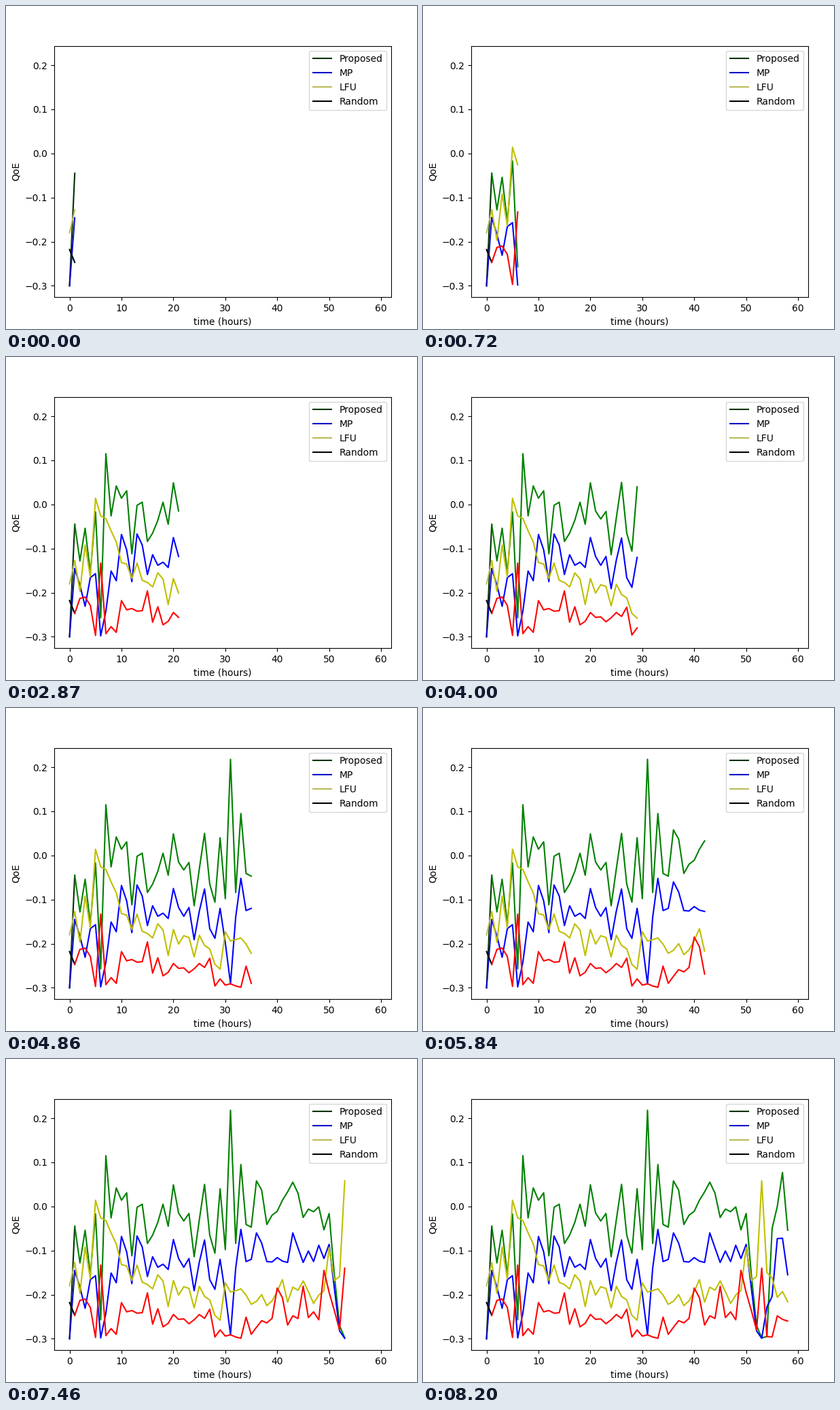
These frames come from a looping animation (605x475 px, 8220 ms). A matplotlib script:

```python
import numpy as np
import matplotlib.pyplot as plt
from matplotlib.animation import FuncAnimation

WIDTH, HEIGHT, DPI = 605, 475, 100
LOOP_MS, TICK_MS = 8220, 30

# Hourly QoE, in thousandths
PROPOSED = [
    -300, -45, -128, -54, -155, -17, -257, 115, -26, 42,
    14, 31, -112, -2, 5, -84, -65, -36, 5, -45,
    49, -15, -33, -16, -114, -30, 50, -65, -106, 40,
    -98, 218, -84, 95, -41, -47, 58, 37, -41, -20,
    -11, 14, 33, 55, 30, -25, -6, -12, -1, -53,
    -16, -155, -270, -298, -295, -50, 0, 77, -54]
MOST_POPULAR = [
    -300, -146, -183, -231, -166, -157, -298, -242, -151, -173,
    -68, -103, -175, -67, -92, -159, -114, -138, -131, -143,
    -75, -118, -138, -118, -191, -126, -76, -166, -188, -120,
    -198, -291, -140, -52, -125, -120, -60, -83, -125, -126,
    -116, -124, -127, -60, -94, -127, -101, -125, -88, -118,
    -86, -185, -282, -299, -228, -204, -73, -72, -155]
LEAST_USED = [
    -180, -128, -197, -92, -164, 14, -26, -32, -60, -85,
    -132, -135, -168, -133, -172, -177, -187, -155, -169, -227,
    -168, -201, -182, -186, -230, -181, -204, -212, -247, -258,
    -173, -194, -191, -187, -201, -222, -215, -200, -225, -214,
    -193, -166, -217, -183, -190, -169, -193, -220, -201, -191,
    -93, -168, -159, 58, -150, -162, -206, -193, -216]
RANDOM = [
    -218, -247, -213, -210, -229, -297, -133, -293, -277, -290,
    -218, -239, -236, -242, -241, -196, -267, -232, -273, -265,
    -245, -256, -255, -266, -257, -245, -254, -233, -296, -280,
    -294, -291, -296, -299, -251, -290, -274, -259, -264, -254,
    -185, -207, -269, -248, -254, -181, -252, -239, -257, -145,
    -195, -236, -280, -140, -295, -296, -248, -256, -260]

# Newest hour on show, and the time in ms at which it appears
KEY_HOURS = [1, 2, 9, 10, 12, 13, 17, 18, 21, 22, 25, 26, 29, 30,
             33, 34, 41, 42, 43, 48, 49, 53, 54, 56, 57, 58]
KEY_TIMES = [0, 130, 1130, 1280, 1570, 1720, 2290, 2420, 2870, 3020,
             3450, 3580, 4000, 4130, 4550, 4700, 5710, 5840, 5970, 6740,
             6890, 7460, 7590, 7900, 8050, 8200]
hours = np.arange(59)
starts = np.interp(hours[1:], KEY_HOURS, KEY_TIMES)

fig = plt.figure(figsize=(WIDTH / DPI, HEIGHT / DPI), dpi=DPI)
ax = fig.add_axes([71 / WIDTH, 46.8 / HEIGHT, 496 / WIDTH, 369.6 / HEIGHT])
ax.set_xlim(-2.95, 61.95)
ax.set_ylim(-0.3259, 0.2439)
ax.set_xlabel("time (hours)")
ax.set_ylabel("QoE")


def add_series(label, values, first_color, color):
    """Draw the fixed first hour and return the growing line with its data."""
    qoe = np.array(values) / 1000
    ax.plot(hours[:2], qoe[:2], color=first_color, label=label)
    line, = ax.plot([], [], color=color)
    return line, qoe


series = [
    add_series("Proposed", PROPOSED, "#003200", "g"),
    add_series("MP", MOST_POPULAR, "#0c0cc8", "b"),
    add_series("LFU", LEAST_USED, "#bcbc58", "y"),
    add_series("Random", RANDOM, "black", "r"),
]
ax.legend(loc="upper right")


def update(frame):
    now = frame * TICK_MS + 20
    last = np.searchsorted(starts, now, side="right")
    for line, qoe in series:
        line.set_data(hours[1:last + 1], qoe[1:last + 1])
    return [line for line, _ in series]


anim = FuncAnimation(fig, update, frames=LOOP_MS // TICK_MS,
                     interval=TICK_MS, repeat=True, repeat_delay=0)
plt.show()
```
